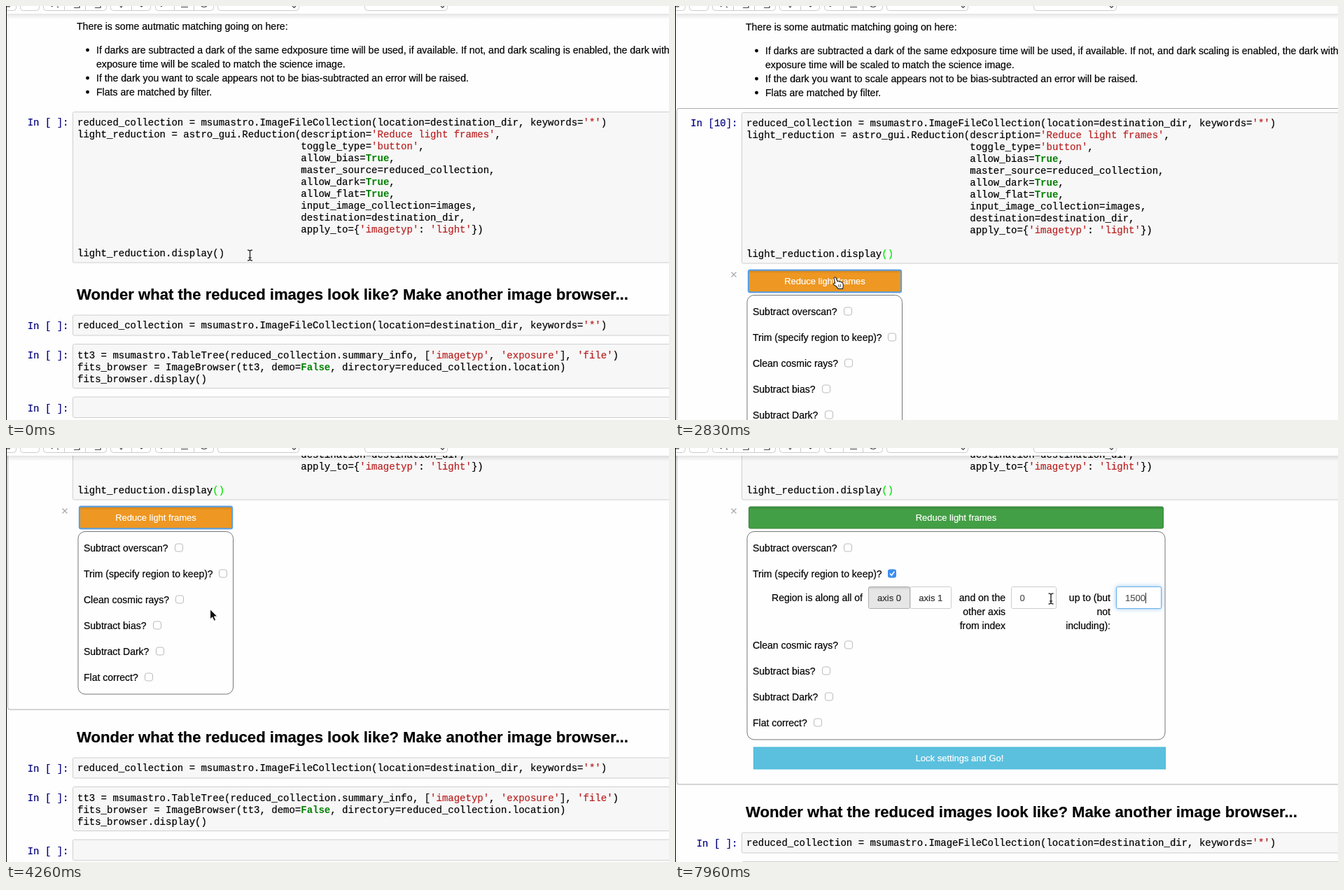
An HTML page that plays this animation: 947x592 px, repeating every 8 s.

```html
<!DOCTYPE html>
<html lang="en">
<head>
<meta charset="utf-8">
<title>Notebook: reduce light frames</title>
<style>
html, body { margin: 0; width: 100%; height: 100%; overflow: hidden; background: #fefefe; }
svg { display: block; width: 100vw; height: 100vh; }
text { font: 14px "Liberation Sans", Arial, sans-serif; color: #000; }
text, tspan { fill: currentColor; stroke: currentColor; stroke-width: .2px; }
.para { font-size: 14.1px; }
.head { font-size: 22.1px; font-weight: bold; }
.code, .prompt { font: 14px "Liberation Mono", "Courier New", monospace; }
.prompt { color: #000080; text-anchor: end; }
.str { color: #ba2121; }
.key { color: #008000; font-weight: bold; stroke: none; }
.btn { font-size: 13px; color: #333; text-anchor: middle; }
.lit { color: #fff; }
.field { font-size: 13px; color: #555; }
.end { text-anchor: end; }
.area { fill: #f7f7f7; stroke: #cfcfcf; }
.cell { fill: none; stroke: #ababab; }
.panel { fill: #fefefe; stroke: #777; }
.box { fill: #fff; stroke: #bbb; }
.input { fill: #fff; stroke: #ccc; }
#glow { stroke: #66afe9; filter: drop-shadow(0 0 3px rgba(102,175,233,.7)); }
</style>
</head>
<body>
<script>
const LOOP = 8000;

const text = (x, y, s, cls = '', id = '') =>
  `<text x="${x}" y="${y}" class="${cls}" id="${id}">${s}</text>`;
const rect = (x, y, w, h, cls, r = 2, extra = '') =>
  `<rect x="${x}" y="${y}" width="${w}" height="${h}" rx="${r}" class="${cls}" ${extra}/>`;
const group = (id, ...parts) => `<g id="${id}">${parts.join('')}</g>`;

const highlight = s => s.replace(/ /g, '\u00a0')
  .replace(/'[^']*'/g, m => `<tspan class="str">${m}</tspan>`)
  .replace(/True|False/g, m => `<tspan class="key">${m}</tspan>`);
const code = (y, lines) =>
  lines.map((s, i) => text(102, y + 17 * i, highlight(s), 'code')).join('');

const colors = {
  plain: ['#fff', '#ccc'], hover: ['#e6e6e6', '#adadad'], press: ['#dcdcdc', '#adadad'],
  orange: ['#ee9722', '#d58512'], green: ['#439f45', '#398439'], blue: ['#5bc0de', '#46b8da']
};
function button(x, y, w, label, kind, sunk, r = 2) {
  const [fill, stroke] = colors[kind];
  const lit = 'orange green blue'.includes(kind) ? 'lit' : '';
  return rect(x, y, w, 31, '', r, `fill="${fill}" stroke="${stroke}"`) +
    (sunk ? rect(x + .5, y + .5, w - 1, 4, '', 1, 'fill="url(#sunk)"') : '') +
    text(x + w / 2, y + 20, label, 'btn ' + lit);
}

const tick = (x, y) => rect(x - 6, y - 6, 12, 12, '', 3, 'fill="#3b8ef0"') +
  `<path d="M${x - 3} ${y}l2.3 2.7 4-5.4" fill="none" stroke="#fff" stroke-width="1.6"/>`;
const options = [['Subtract overscan?', 247], ['Trim (specify region to keep)?', 310],
  ['Clean cosmic rays?', 248], ['Subtract bias?', 216], ['Subtract Dark?', 220], ['Flat correct?', 204]];
const panel = (w, h, gap) => rect(103, 413.5, w, h, 'panel', 10) +
  options.map(([label, x], i) => {
    const y = 436.5 + 37 * i + (i > 1 ? gap : 0);
    return text(111, y + 5, label) + rect(x - 5.5, y - 5.5, 11, 11, 'box', 3);
  }).join('');
const stack = (x, lines) => lines.map((s, i) => text(x, 513 + 20 * i, s, 'end')).join('');

const intro = [
  [101, 34.5, 'There is some autmatic matching going on here:'],
  [129, 68.5, 'If darks are subtracted a dark of the same edxposure time will be used, if available. If not, and dark scaling is enabled, the dark with the closest'],
  [129, 88.5, 'exposure time will be scaled to match the science image.'],
  [129, 108.5, 'If the dark you want to scale appears not to be bias-subtracted an error will be raised.'],
  [129, 128.5, 'Flats are matched by filter.']
].map(a => text(...a, 'para')).join('') +
  [63, 103, 123].map(y => `<circle cx="116.5" cy="${y + 1}" r="2.4"/>`).join('');

const pad = ' '.repeat(38);
const loadLine = "reduced_collection = msumastro.ImageFileCollection(location=destination_dir, keywords='*')";
const reduceCode = [loadLine,
  "light_reduction = astro_gui.Reduction(description='Reduce light frames',",
  ...["toggle_type='button',", 'allow_bias=True,', 'master_source=reduced_collection,',
    'allow_dark=True,', 'allow_flat=True,', 'input_image_collection=images,',
    'destination=destination_dir,', "apply_to={'imagetyp': 'light'})"].map(s => pad + s)];

const upper = group('upper', intro,
  rect(2.5, 146.5, 960, 228, 'cell', 3, 'id="cellOne"'),
  rect(95.5, 152.5, 870, 215.5, 'area'),
  text(89.5, 172, '', 'prompt', 'count'),
  code(172, reduceCode),
  text(102, 359, 'light_reduction.display<tspan id="parens">()</tspan>', 'code'),
  '<path id="caret" d="M312 347v16" stroke="#000"/>',
  group('output',
    '<path d="M80.5 380.5l7 7m0-7l-7 7" stroke="#aaa" stroke-width="1.3"/>',
    group('plain', button(105.5, 378, 141, 'Reduce light frames', 'plain')),
    group('hover', button(105.5, 378, 141, 'Reduce light frames', 'hover')),
    group('press', button(105.5, 378, 141, 'Reduce light frames', 'press', true)),
    group('narrow',
      button(105.5, 378, 217, 'Reduce light frames', 'orange', true),
      group('ring',
        rect(104, 376.7, 220, 33.6, '', 3, 'fill="none" stroke="#8fc0f2" opacity=".5"'),
        rect(105, 377.7, 218, 31.6, '', 2, 'fill="none" stroke="#5b9fe0" stroke-width="2"')),
      panel(221.5, 232.5, 0), group('ticked', tick(310, 473.5))),
    group('wide',
      button(105.5, 378, 592, 'Reduce light frames', 'green', true),
      panel(597, 297.5, 65), tick(310, 473.5),
      text(268, 513, 'Region is along all of', 'end'),
      button(336, 492.5, 58.5, 'axis 1', 'plain'),
      button(276.5, 492.5, 59, 'axis 0', 'hover', true),
      stack(472, ['and on the', 'other axis', 'from index']),
      rect(480.5, 492.5, 64, 31, 'input'), text(492.5, 512.5, '0', 'field'),
      stack(622, ['up to (but', 'not', 'including):']),
      rect(630.5, 492.5, 64, 31, 'input'),
      rect(630.5, 492.5, 64, 31, 'input', 2, 'id="glow"'),
      text(643, 512.5, '', 'field', 'value'),
      '<path id="bar" d="M0 501v15" stroke="#222"/>',
      button(112.5, 722, 588, 'Lock settings and Go!', 'blue', false, 0))));

const lower = group('lower',
  rect(2.5, 424.5, 960, 61, 'cell', 3, 'id="cellTwo"'),
  text(101, 470.5, 'Wonder what the reduced images look like? Make another image browser...', 'head'),
  rect(95.5, 493, 870, 29, 'area'), code(512, [loadLine]),
  rect(95.5, 534.5, 870, 63, 'area'),
  code(554.5, ["tt3 = msumastro.TableTree(reduced_collection.summary_info, ['imagetyp', 'exposure'], 'file')",
    'fits_browser = ImageBrowser(tt3, demo=False, directory=reduced_collection.location)',
    'fits_browser.display()']),
  rect(95.5, 610, 870, 29.5, 'area'),
  [512.5, 554.5, 630.5].map(y => text(89.5, y, 'In\u00a0[\u00a0]:', 'prompt')).join(''));

const tool = (x, end, ...splits) => rect(x + .5, -20, end - x - 1, 26.5, 'input', 4) +
  splits.map(s => `<path d="M${s + .5} 0v6.5" stroke="#ccc"/>`).join('');
const toolbar = rect(0, 11, 947, 8, '', 0, 'fill="url(#shade)"') +
  rect(0, 0, 947, 11, '', 0, 'fill="#fefefe"') +
  tool(-20, 15) + tool(20, 48) + tool(53, 144, 83, 113) + tool(149, 207, 179) +
  tool(213, 297, 240, 268) + tool(302, 419) + tool(512, 631) +
  `<path d="M1 .8h5M65 1l3-2m5 2l2 1M97 2.5h8v-3M127 2.5h8v-3M163 0l1.5 2 1.5-2M192 0l1.5 1 1.5-1
    M221 1l3-2M250 1.5h10M279 0q4 3 8 0M409 0l2.5 2.5L414 0M621 0l2.5 2.5L626 0"
    fill="none" stroke="#444" stroke-width="1.2"/>`;

const beamPath = 'M-3.5-7.5Q0-7.5 0-5.5Q0-7.5 3.5-7.5M0-5.5V5.5M-3.5 7.5Q0 7.5 0 5.5Q0 7.5 3.5 7.5M-2 3.5H2';
const pointer = group('pointer',
  group('beam', `<path d="${beamPath}" fill="none" stroke="#fff" stroke-width="3" opacity=".7"/>`,
    `<path d="${beamPath}" fill="none" stroke="#333" stroke-width="1.5"/>`),
  group('arrow', '<path d="M0 0V14L3.2 11.2 5.5 16.5 8 15.4 5.7 10.2H10.2Z" fill="#111" stroke="#fff" stroke-width=".9"/>'),
  group('hand', `<path d="M-2 1.2Q-.5-1.2 1 1L3 6Q5 4.6 5.8 6.4 7.6 5.4 8.4 7.2 10.4 6.6 10.8 8.8
    Q12 12 10.6 16.5H4Q2 13-2.5 10.5-3.6 8-.4 8.6Z" fill="#fff" stroke="#222" stroke-width="1.1"/>
    <path d="M4.5 10.5l1 4M7 10l.8 4" stroke="#222" stroke-width=".9"/>`));

document.body.innerHTML = `<svg viewBox="0 0 947 592"><defs>
  <linearGradient id="shade" x2="0" y2="1"><stop stop-color="#000" stop-opacity=".1"/><stop offset="1" stop-opacity="0"/></linearGradient>
  <linearGradient id="sunk" x2="0" y2="1"><stop stop-color="#000" stop-opacity=".12"/><stop offset="1" stop-opacity="0"/></linearGradient>
  </defs>${upper}${lower}${toolbar}<path d="M.5 0V592" stroke="#000"/>${pointer}</svg>`;

const el = {};
document.querySelectorAll('[id]').forEach(n => { if (n.id) el[n.id] = n; });
const show = (id, on) => { el[id].style.display = on ? '' : 'none'; };
const move = (id, x, y) => el[id].setAttribute('transform', `translate(${x} ${y})`);

// Tables of [time, ...values]: step holds the last row, track blends between rows.
const step = (t, rows) => rows.filter(r => r[0] <= t).pop()[1];
function track(t, rows) {
  const i = rows.findIndex(r => r[0] > t);
  if (i < 0) return rows[rows.length - 1].slice(1);
  if (i === 0) return rows[0].slice(1);
  const [from, to] = [rows[i - 1], rows[i]];
  const k = (t - from[0]) / (to[0] - from[0]);
  return from.slice(1).map((v, j) => v + (to[j + 1] - v) * k);
}

const scroll = [[3580, 0], [3660, -28], [3800, -113], [3870, -155], [3930, -184],
  [4110, -184], [4160, -255], [4200, -285], [4230, -294]];
const push = [[0, -50], [1400, 0], [2830, 244], [5100, 351]];
const prompts = [[0, '[ ]'], [560, '[*]'], [1400, '[10]']];
const typed = [[0, '3073'], [6230, '307'], [6360, '30'], [6600, '3'], [6860, ''],
  [7200, '1'], [7500, '15'], [7600, '150'], [7700, '1500']];
const path = [[1850, 348.5, 356.5], [1900, 341, 366], [1960, 318, 395], [2030, 280, 416],
  [2090, 250, 407], [2160, 229, 388], [4180, 229, 387.5], [4260, 291.5, 231], [4400, 310, 192],
  [4560, 309.5, 174], [5200, 309.5, 174], [5300, 360, 182], [5450, 540, 202], [5560, 650, 213],
  [5640, 687, 215], [7930, 687, 215], [7960, 537, 215.5]];
const shapes = [[0, 'beam'], [1900, 'arrow'], [2080, 'hand'], [3630, 'arrow'], [3730, 'beam'],
  [3860, 'arrow'], [5550, 'beam'], [6130, 'none'], [7930, 'beam']];

function draw(t) {
  const top = t < 30 ? -1 : Math.round(track(t, scroll)[0]);
  const extra = step(t, push);
  move('upper', 0, top);
  move('lower', 0, top + extra);

  const editing = t >= 30 && t < 560;
  show('cellOne', editing || t >= 2730);
  el.cellOne.setAttribute('height', 277.5 + extra);
  el.cellOne.style.stroke = editing ? '#008000' : '#ababab';
  show('cellTwo', t >= 560 && t < 2730);
  show('caret', t >= 130 && t < 560);
  el.parens.style.color = t >= 130 ? '#00e800' : '#000';
  el.count.textContent = `In ${step(t, prompts)}:`.replace(/ /g, '\u00a0');

  show('output', t >= 1400);
  show('plain', t < 2080);
  show('hover', t >= 2080 && t < 2730);
  show('press', t >= 2730 && t < 2830);
  show('narrow', t >= 2830 && t < 5100);
  show('ring', t < 4700);
  show('ticked', t >= 4830);
  show('wide', t >= 5100);

  const value = step(t, typed);
  el.value.textContent = value;
  show('bar', t >= 5650);
  move('bar', 643.5 + 7.23 * value.length, 0);
  el.glow.style.opacity = track(t, [[5650, 0], [5800, 1]])[0];

  const shape = step(t, shapes);
  ['beam', 'arrow', 'hand'].forEach(s => show(s, s === shape));
  move('pointer', ...track(t, path));
}

const start = performance.now();
function frame() {
  draw((performance.now() - start) % LOOP);
  requestAnimationFrame(frame);
}
frame();
</script>
</body>
</html>
```
